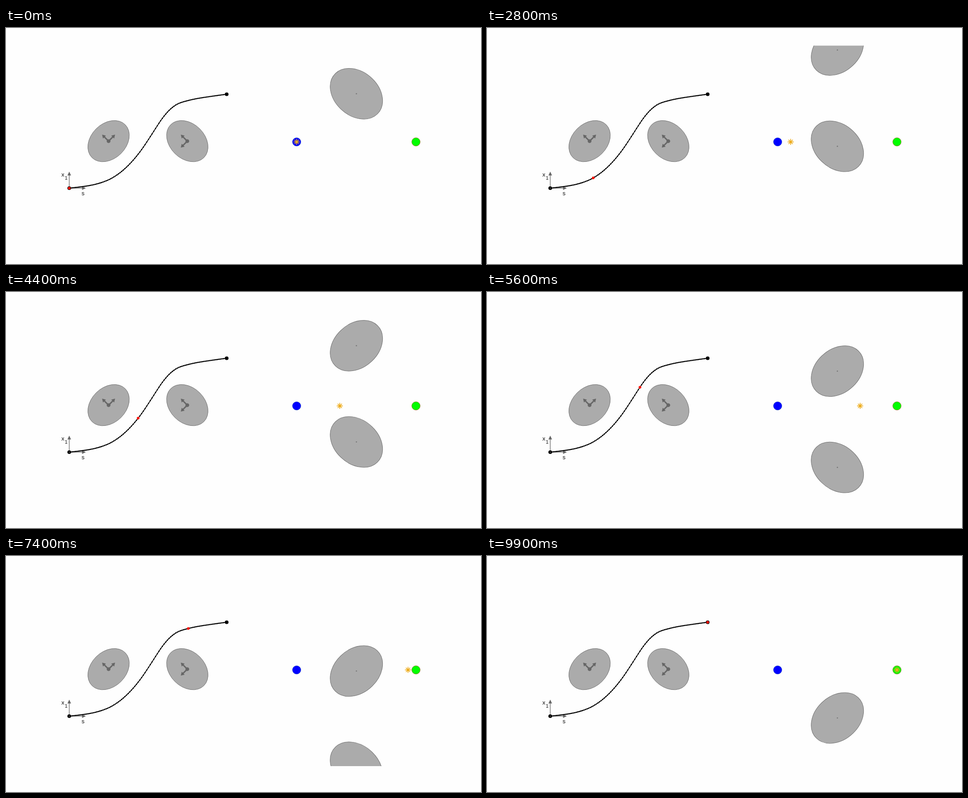
An HTML page for the animation above (10000 ms loop, 1059x529 px).

```html
<!DOCTYPE html>
<html lang="en">
<head>
<meta charset="utf-8">
<title>Path between moving obstacles</title>
<style>
  html, body { margin: 0; width: 100%; height: 100%; overflow: hidden; background: #fefefe; }
  svg { display: block; width: 100%; height: 100%; }
  text { font-family: "Liberation Sans", Arial, sans-serif; fill: #111; }
  .disc { fill: #ababab; stroke: #707070; stroke-width: 1; vector-effect: non-scaling-stroke; }
  .axis { stroke: #666; stroke-width: 1.3; }
  .vector { stroke: #666; stroke-width: 3; }
  .head { fill: #666; }
</style>
</head>
<body>
<svg viewBox="0 0 1059 529">
  <defs>
    <clipPath id="view"><rect x="560" y="39.5" width="440" height="431.5"/></clipPath>
    <ellipse id="disc" class="disc" rx="52.3" ry="39.2"/>
    <g id="axis">
      <path class="axis" d="M0 0H30"/>
      <path class="head" d="M37 0L28.5 -4V4Z"/>
    </g>
    <g id="vector">
      <path class="vector" d="M0 0H15"/>
      <path class="head" d="M20.5 0L13 -4.6V4.6Z"/>
    </g>
  </defs>

  <g transform="translate(228.7 253.6)">
    <use href="#disc" transform="rotate(-45)"/>
    <use href="#vector" transform="rotate(-135)"/>
    <use href="#vector" transform="rotate(-45)"/>
    <circle class="head" r="4.2"/>
  </g>
  <g transform="translate(404.2 253.6)">
    <use href="#disc" transform="rotate(45)"/>
    <use href="#vector" transform="rotate(-135)"/>
    <use href="#vector" transform="rotate(135)"/>
    <circle class="head" r="4.2"/>
  </g>

  <g transform="translate(141 359)">
    <use href="#axis"/>
    <use href="#axis" transform="rotate(-90)"/>
  </g>
  <text x="123.5" y="333" font-size="13">x</text>
  <text x="131" y="340" font-size="11">1</text>
  <text x="168.6" y="374.5" font-size="13">s</text>

  <path id="curve" fill="none" stroke="#000" stroke-width="1.7"/>
  <path id="beads" fill="none" stroke="#000" stroke-width="2.9" stroke-linecap="round"/>
  <circle cx="141" cy="359" r="4.1"/>
  <circle cx="141" cy="359" r="1.8" fill="#333"/>
  <circle cx="492" cy="148.5" r="4.1"/>
  <circle id="marker" r="3" fill="#f10"/>

  <g clip-path="url(#view)">
    <g id="first">
      <use href="#disc" transform="scale(1.264 1.2294) rotate(45)"/>
      <circle r="1.4" fill="#777"/>
    </g>
    <g id="second">
      <use href="#disc" transform="scale(1.264 1.2294) rotate(-45)"/>
      <circle r="1.4" fill="#777"/>
    </g>
  </g>
  <circle cx="648" cy="255.3" r="9.4" fill="#00f" stroke="#1a4bb0" stroke-width=".6"/>
  <circle cx="914" cy="255.3" r="9.4" fill="#0f0" stroke="#a0662a" stroke-width=".8"/>
  <path id="star" d="M-6.8 0H6.8M0 -6.8V6.8M-4.7 -4.7L4.7 4.7M-4.7 4.7L4.7 -4.7"
        fill="none" stroke="#edac1c" stroke-width="1.7"/>
</svg>
<script>
  const STEPS = 100, STEP_MS = 100;
  const MID_Y = 255.1, SCALE_S = 1.2294;
  const $ = id => document.getElementById(id);

  // Knots of the curve: x, y, slope.
  const curveKnots = [
    [141, 359, -.105], [178, 354.5, -.15], [216, 345.4, -.35], [237, 336, -.57],
    [294.5, 283, -1.28], [341, 213.5, -1.53], [378, 173, -.62],
    [406.5, 162.5, -.26], [454, 153.8, -.145], [492, 148.5, -.13]
  ];

  // Horizontal position at every eleventh step.
  const stops = [141, 178.4, 216.3, 254.3, 294.6, 337.2, 378.3, 416.8, 454.3, 492];
  const stopKnots = stops.map((x, i) => {
    const a = Math.max(i - 1, 0), b = Math.min(i + 1, stops.length - 1);
    return [i * 11, x, (stops[b] - stops[a]) / (11 * (b - a))];
  });

  function hermite(knots, x) {
    let i = 0;
    while (i < knots.length - 2 && x > knots[i + 1][0]) i++;
    const [x0, y0, m0] = knots[i], [x1, y1, m1] = knots[i + 1];
    const h = x1 - x0, u = (x - x0) / h, v = 1 - u;
    return v * v * (1 + 2 * u) * y0 + u * u * (1 + 2 * v) * y1
         + h * u * v * (v * m0 - u * m1);
  }

  const points = Array.from({ length: STEPS }, (_, i) => {
    const x = hermite(stopKnots, i);
    return [x, hermite(curveKnots, x)];
  });

  $("curve").setAttribute("d", "M" + points.map(p => p.join(" ")).join("L"));
  $("beads").setAttribute("d", points.map(p => `M${p.join(" ")}h.01`).join(""));

  const place = (id, x, y) => $(id).setAttribute("transform", `translate(${x} ${y})`);

  function draw(ms) {
    const [x, y] = points[Math.floor(ms / STEP_MS) % STEPS];
    place("marker", x, y);
    place("first", 781.2, MID_Y + SCALE_S * (x - 228.7));
    place("second", 781.2, MID_Y + SCALE_S * (x - 404.2));
    place("star", 648 + 266 * (359 - y) / 210.5, 255.3);
  }

  const start = performance.now();
  function tick(now) {
    draw(Math.max(0, now - start));
    requestAnimationFrame(tick);
  }
  draw(0);
  requestAnimationFrame(tick);
</script>
</body>
</html>
```
